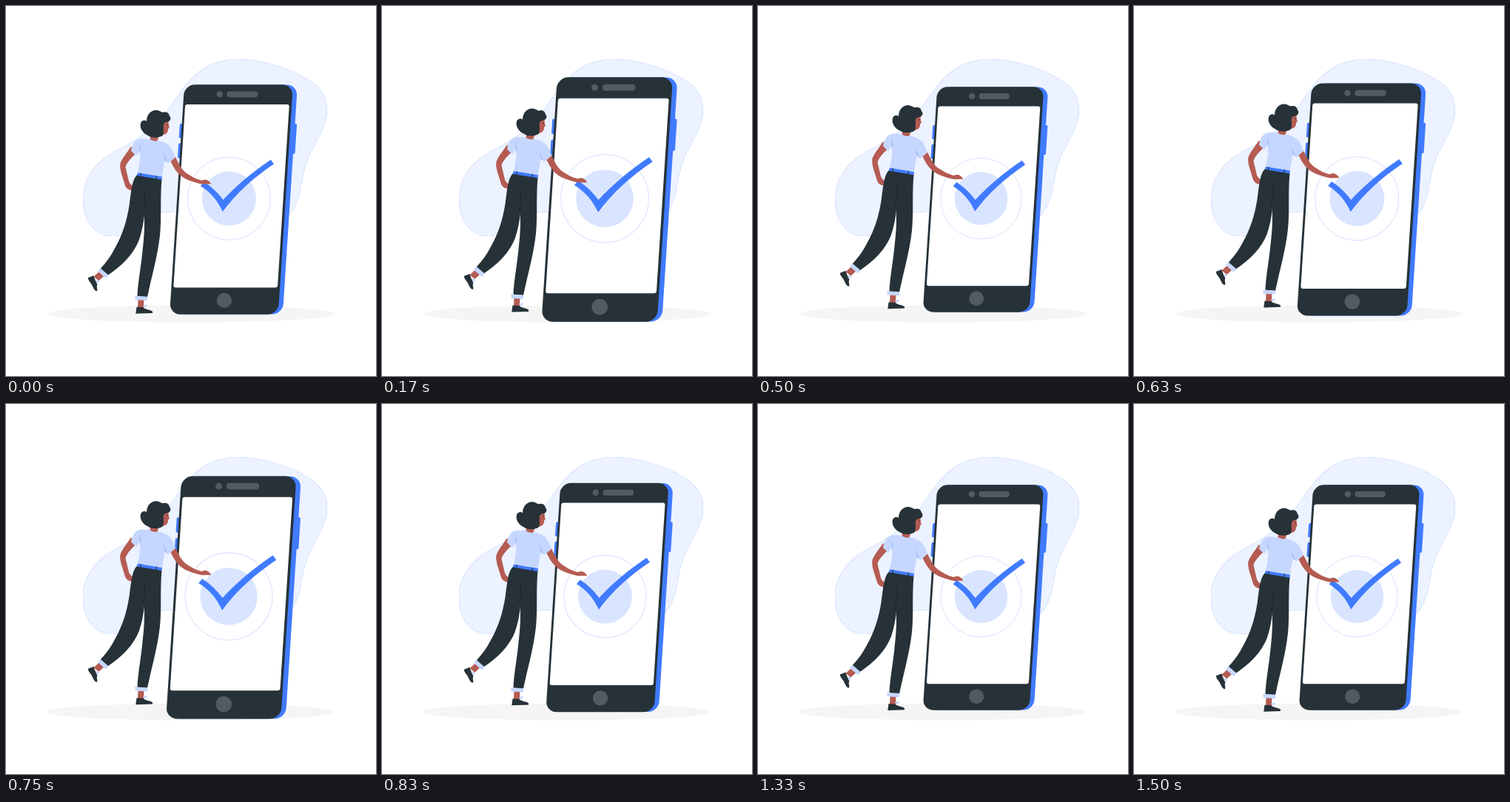
An HTML page for the animation above (1540 ms loop, 500 px wide and 500 px high).

```html
<!DOCTYPE html>
<html lang="en">
<head>
<meta charset="utf-8">
<title>Confirmed</title>
<style>
  html, body { margin: 0; width: 100%; height: 100%; overflow: hidden; background: #fff; }
  svg { display: block; width: 100%; height: 100%; }
  .dark { fill: #263238; }
  .blue { fill: #407bff; }
  .skin { fill: #b55b52; }
  .pale { fill: #c6d7ff; }
  .grey { fill: #515b60; }
  .fold { fill: #a3bcf8; }
</style>
</head>
<body>
<svg viewBox="0 0 500 500">
  <defs>
    <path id="blob" d="M313 72C345 72 390 85 415 104C428 114 434 126 434 140C434 166 414 188 405 215C398 238 399 262 384 281C365 305 330 300 300 292C270 284 235 277 213 279C187 282 175 311 144 311C118 311 104 288 104 262C104 232 122 210 148 196C172 184 190 172 207 155C225 136 236 110 258 91C272 79 292 72 313 72Z"/>
  </defs>
  <use href="#blob" class="blue"/>
  <use href="#blob" fill="#fff" opacity=".9"/>
  <ellipse cx="249.5" cy="416" rx="193.5" ry="11.5" fill="#f5f5f5"/>

  <g id="phone">
    <g transform="matrix(1 0 -.0645 1 16.87 0)">
      <g class="blue">
        <rect x="238.5" y="109.5" width="144" height="304" rx="14"/>
        <rect x="380" y="161" width="5" height="40" rx="1.5"/>
        <rect x="229.8" y="161" width="5" height="19" rx="1.5"/>
        <rect x="229.8" y="187" width="5" height="19.5" rx="1.5"/>
      </g>
      <rect class="dark" x="232.5" y="109.3" width="144" height="304.4" rx="14"/>
      <rect x="235.3" y="135.5" width="138" height="242.7" rx="3" fill="#fff"/>
    </g>
    <g class="grey">
      <circle cx="289" cy="122" r="4.2"/>
      <rect x="298.5" y="118" width="41.3" height="8" rx="4"/>
      <circle cx="295.2" cy="395.3" r="10"/>
    </g>
    <circle cx="301.5" cy="260.2" r="54.7" fill="none" stroke="#d9e3ff"/>
    <circle cx="301.5" cy="260.2" r="35.9" fill="#d9e5ff"/>
    <path class="blue" d="M263.6 243.5L268.3 238C279 245 287 253 293.6 262C312 242 334 224 356.8 208.7L361 214.5C335 232 312 252 293.2 277.5C286 262 277 252 263.6 243.5Z"/>
  </g>

  <g id="woman">
    <path class="skin" d="M169 190C163 199 157 206 154.5 213C153.500 217 155 224 157 230L161 243C163 248 167 249 172 250L173 244C169 242 167 240 166 237L161.500 218C163 212 169 206 175 200Z"/>

    <path class="skin" d="M126 359L132 365.500L125.500 371.500L118.500 366Z"/>
    <path class="dark" d="M110.800 367.500L118.500 364.500C119.500 369 122 373 123.500 376.500C121.500 380 124.500 383 123 385.500C119 385.500 117.500 379.500 115.500 376C113.500 373 111 371 110.800 367.500Z"/>
    <path class="pale" d="M121 371L125.500 371L126 373.500L122.500 375Z"/>
    <path class="dark" d="M176.500 229C170 236 169 252 166.500 270C163 292 157 310 148 326C142 338 135 347 127 356L137 364.500C156 352 173 335 180 316C186 298 188 280 189 250L196 232Z"/>
    <path class="pale" d="M127.500 354.500L138.500 364L135 368.300L124 358.800Z"/>

    <path class="skin" d="M178.500 396L186.500 396L186 409L178 409Z"/>
    <path class="pale" d="M185 405L190 403.500L191 405.500L187 408Z"/>
    <path class="dark" d="M176.500 407L185.500 407.500C189 411 195 410.500 198 413L198 415.300L175.300 416Z"/>
    <path class="dark" d="M177 229L210.500 234C208 262 210.500 286 208 310C205 338 197 365 191 393.500L177.500 392.500C178 376 182 355 184 336C186 318 188 300 186.500 282L182 240Z"/>
    <path d="M187.500 250Q187.700 266 185.800 279" fill="none" stroke="#1a2327" stroke-width=".8"/>
    <path class="pale" d="M174 392L191.500 393L190.700 398.300L174.800 397.300Z"/>

    <path class="skin" d="M195.500 175L206.500 176L204 184L194 182Z"/>
    <path class="pale" d="M181 179.500C187 179 190 179.800 194.500 180.300Q200 184 205.500 182C212 183.500 218 186 222 190C225 194 227 199 229 204.500L219.500 213L214.500 209C213.500 217 211.500 225 211 231.500L178 226C180 218 181.500 207 181.300 195L176 203L169 196C170 190 172.500 181.500 181 179.500Z"/>
    <path class="fold" d="M181 184Q179.700 192 181.300 201L182.200 195Z"/>
    <path class="fold" d="M211.500 194Q215 203 217.800 211.700L214.500 209Q214 201 211.500 194Z"/>
    <path class="blue" d="M178 225.500L211 231L210.300 235L176.700 229.300Z"/>
    <path d="M182.300 226L181.500 230.500M203.500 229.500L202.700 234.200" fill="none" stroke="#263238" stroke-width="1.1"/>

    <path class="skin" d="M222.500 210.300L229.200 204.500C234 215 238 222 244 226.200C251 231 258 234.500 264.500 236C268.500 233.800 274 234.500 277.300 240.800L265 241C257 239.500 250 237 243 234C235 230 229 224 222.500 210.300Z"/>

    <path class="skin" d="M210 157L219.300 153.500C219.700 158 219.500 160 220.800 164.500L219 166.500C219.200 170.500 217 174.500 211 174.500Z"/>
    <path class="dark" d="M190 156C190 147 196 140.500 203.500 141C208 141.300 210 144.500 213 143.800C218 142.500 220.500 146 221 149C223.300 151 222.800 155 219.500 156.500C216 157 213.500 158 212.800 161C212.500 167 214 171.500 211.500 175.500C206 179 196 179 190.500 174.500C184 171.500 180.300 164 182 158.500C183.500 154 188 154 190 156Z"/>
    <circle class="dark" cx="217.800" cy="160.500" r=".8"/>
  </g>
</svg>
<script>
  const LOOP = 1540, FPS = 24;
  const phone = document.getElementById("phone");
  const woman = document.getElementById("woman");

  // Linear bump: 0 at start, 1 at peak, 0 at end
  const bump = (t, start, peak, end) =>
    Math.max(0, Math.min((t - start) / (peak - start), (end - t) / (end - peak)));

  function draw(t) {
    const pulse = bump(t, -30, 125, 405) + bump(t, 580, 720, 855) + bump(t, 1510, 1665, 1945);
    const scale = 1 + 0.1 * pulse;
    phone.setAttribute("transform",
      `translate(307 261.500) scale(${scale}) translate(-307 -261.500)`);

    const rise = 10 * bump((t + 15) % 1500, 0, 750, 1500);
    woman.setAttribute("transform", `translate(0 ${-rise})`);
  }

  // Motion advances at 24 steps per second
  function tick() {
    const t = performance.now() % LOOP;
    const step = Math.min(36, Math.floor((t + 4) * FPS / 1000));
    draw(step * 1000 / FPS);
    requestAnimationFrame(tick);
  }
  tick();
</script>
</body>
</html>
```
